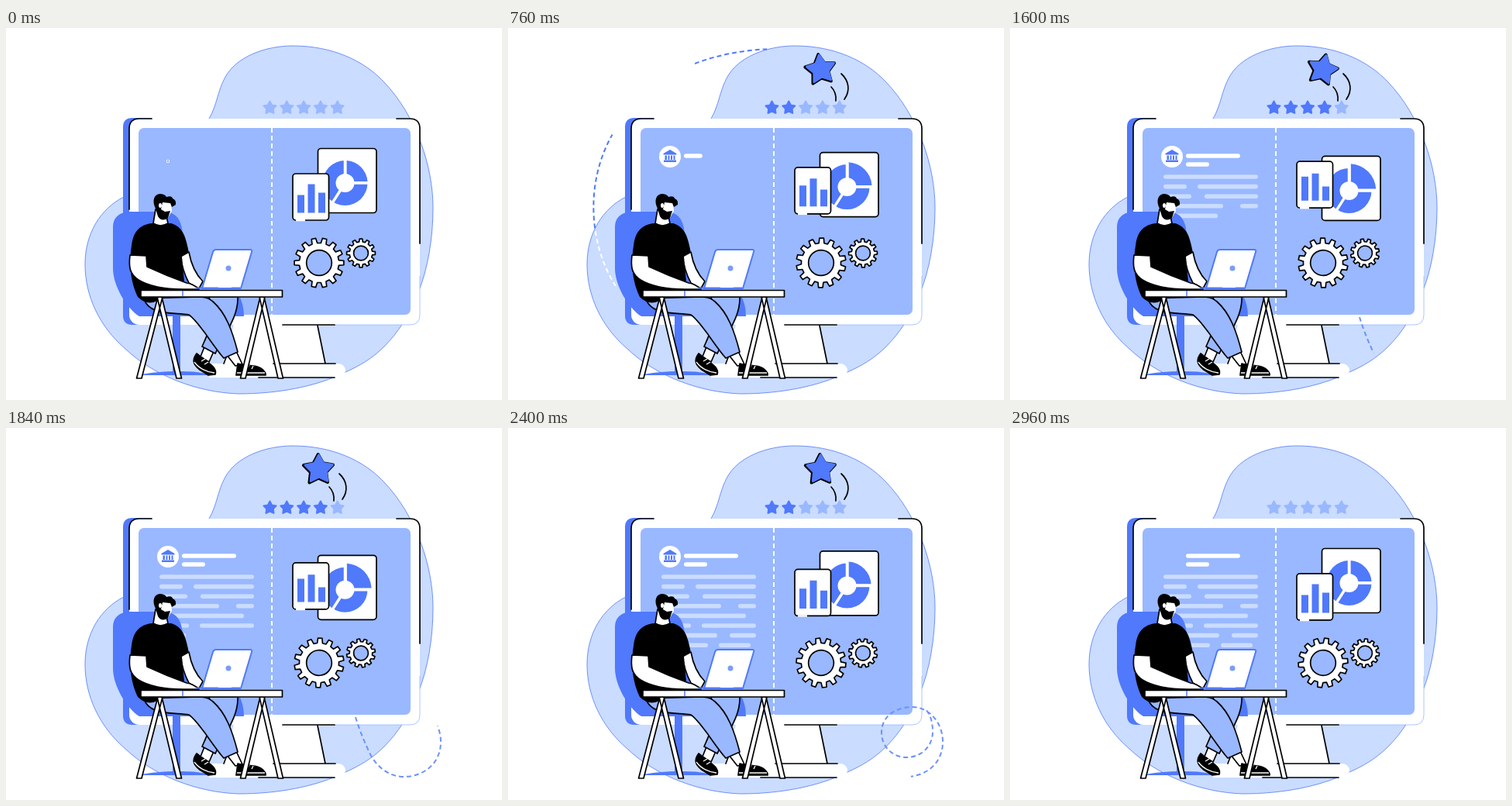
An HTML page that plays this animation: 640x480 px, repeating every 3000 ms.

```html
<!DOCTYPE html>
<html>
<head>
<meta charset="utf-8">
<style>
html, body { margin: 0; width: 100%; height: 100%; overflow: hidden; background: #fff; }
svg { display: block; width: 640px; height: 480px; }
.b { fill: #5079fb; }
.l { fill: #99b8ff; }
.w { fill: #fff; }
.k { stroke: #000; stroke-width: 1.7; stroke-linejoin: round; stroke-linecap: round; }
.n { fill: none; }
.trail { fill: none; stroke-width: 2; stroke-dasharray: 6 4; }
</style>
</head>
<body>
<svg viewBox="0 0 640 480">
  <linearGradient id="split" gradientUnits="userSpaceOnUse" x1="0" y1="0" x2="0" y2="480">
    <stop offset=".54" stop-color="#5079fb"/>
    <stop offset=".54" stop-color="#fff"/>
  </linearGradient>

  <path fill="#cadcff" stroke="#5079fb" stroke-width=".8" d="M262 117C272 100 273 82 282 65C296 37 335 23 370 23C421 23 462 42 488 70C529 113 551 178 551 232C551 272 544 312 532 341C520 372 505 394 488 411C472 427 456 436 438 444C400 463 350 472 300 472C245 470 190 448 154 414C120 385 102 345 102 305C102 265 122 233 152 218Z"/>

  <!-- monitor -->
  <path class="w" d="M294 383H402L412 433H429A9 9 0 0 1 429 451H262V433H280Z"/>
  <path class="k n" d="M402 384L412 433M292 404L281 433M345 433H425M326 451H424"/>
  <path class="b" d="M188 116H163Q151 116 151 128V371Q151 383 163 383H188Z"/>
  <rect class="w" x="159" y="117" width="375" height="266" rx="13"/>
  <path class="n" stroke="#99b8ff" stroke-width=".8" d="M534 320V370Q534 383 521 383H424"/>
  <path class="k n" d="M188 117H172Q159 117 159 130V234M504 117H521Q534 117 534 130V278M357 383H424"/>
  <rect class="l" x="171" y="129" width="351" height="241" rx="7"/>
  <path class="n" stroke="#fff" stroke-width="2" stroke-dasharray="6 4" d="M343 129V370"/>

  <!-- page text -->
  <g id="text" stroke-width="5.6" stroke-linecap="round"></g>
  <g id="icon">
    <circle class="w" r="14"/>
    <path class="b" d="M-8.500-4L0-9L8.500-4V-2.500H-8.500ZM-6.500-1.500H-4V4H-6.500ZM-2.500-1.500H-.5V4H-2.500ZM1-1.500H3V4H1ZM4.500-1.500H6.500V4H4.500ZM-8 4.500H8V7H-8Z"/>
  </g>

  <!-- charts -->
  <g id="pieCard">
    <rect class="w k" x="402.500" y="155.500" width="75.500" height="83" rx="4"/>
    <g transform="translate(437.500 200)">
      <circle class="b" r="29"/>
      <path class="w" d="M0 0V-31H31V0Z"/>
      <path id="slice" class="b" d="M2-2V-29A29 29 0 0 1 29-2Z"/>
      <path stroke="#fff" stroke-width="3.500" d="M0 0V-30M0 0H30M0 0L-16 25"/>
      <circle class="w" r="12"/>
    </g>
  </g>
  <g id="barCard">
    <rect class="w k" x="370" y="188" width="46.500" height="60" rx="4"/>
    <path stroke="#fff" stroke-width="2.500" d="M374 248H386"/>
    <path id="bars" class="b"/>
  </g>
  <g id="gears"></g>

  <!-- ratings -->
  <g id="stars"></g>
  <g id="badge">
    <path class="k n" d="M14 22Q21 29 20 40M27 5C37 14 39 27 31 38"/>
    <g id="bigStar"></g>
  </g>
  <g id="trails"></g>

  <!-- chair -->
  <path class="b" d="M157 237H204C222 238 228 250 228 272L236 344H300Q307 356 307 372H172C156 362 138 333 138 310V257Q138 240 157 237Z"/>
  <path class="b" d="M215 370H225V443Q252 443 265 448H171Q185 444 215 443Z"/>

  <!-- legs -->
  <path class="w k" d="M257 409L251 424L262 431L269 415Z"/>
  <path class="l k" d="M262 347H299C300 370 286 389 270 420L253 411C262 392 270 372 262 347Z"/>
  <path class="w k" d="M285 422L296 436L305 434L297 417Z"/>
  <path class="l k" d="M178 349C184 371 215 367 236 370C250 380 263 405 281 426L299 418C292 391 284 368 267 353Q260 347 250 347Z"/>
  <path class="k" d="M246 420C240 428 241 434 250 441L261 448L270 447Q272 441 265 435Z"/>
  <path class="n" stroke="#fff" stroke-width="1.300" d="M243 431Q252 443 269 445M252 430L257 427M256 434L261 431"/>
  <path class="k" d="M299 433C309 437 329 432 335 446V448H297Z"/>
  <path class="n" stroke="#fff" stroke-width="1.300" d="M298 445H334M311 440L314 435M317 440L319 436"/>

  <!-- torso and head -->
  <path class="w k" d="M225 292L236 289C239 306 245 318 254 327L249 336L236 329Q227 312 225 292Z"/>
  <path d="M188 252C172 254 164 263 162 281C158 305 161 329 170 347Q182 359 195 352L231 338L227 295L236 290C232 270 229 257 213 252Z"/>
  <path class="w k" d="M160 293L181 294L182 308C199 316 219 324 233 329Q241 330 249 337H229C206 337 184 333 171 325C160 318 158 309 160 293Z"/>
  <path class="w k" d="M193 234L190 252Q199 258 209 252L207 243Z"/>
  <path class="w" d="M197 222L213 225L214 236L209 245H198Z"/>
  <path d="M193 233C188 223 191 215 198 214Q205 214 207 218Q214 216 215 220Q220 222 219 228L214 231L212 226L202 225L200 234L205 237L212 236L209 245Q201 251 196 243Z"/>
  <ellipse class="w" cx="199" cy="229" rx="2" ry="3"/>

  <!-- laptop and desk -->
  <path class="w" stroke="#5079fb" stroke-width="2" stroke-linejoin="round" d="M271 286H315Q318 286 317 289L303 336H253L267 289Q268 286 271 286Z"/>
  <circle cx="287" cy="310" r="3.500" fill="#7a9cfb"/>
  <path stroke="#5079fb" stroke-width="2" d="M245 335.500H274M291 335.500H302"/>
  <g class="w k">
    <path d="M196 347L168.500 452H175L202 347ZM195 347L220 452H226.500L201 347Z"/>
    <path d="M328 347L302.500 452H309L334 347ZM327 347L351 452H357.500L333 347Z"/>
    <rect x="174" y="338.500" width="182.500" height="8.500"/>
  </g>
  <path stroke="#5079fb" stroke-width="1.500" d="M228 339V346"/>
</svg>
<script>
const LOOP = 3000, FRAME = 40, TAU = 2 * Math.PI;
const $ = id => document.getElementById(id);
const clamp = x => Math.min(1, Math.max(0, x));
const smooth = x => x * x * (3 - 2 * x);
const backOut = x => 1 + 2.7 * (x - 1) ** 3 + 1.7 * (x - 1) ** 2;
const progress = (t, start, duration) => clamp((t - start) / duration);
// grows past full size, holds, and leaves the same way
const pop = (t, start, end) => t < LOOP / 2 ? backOut(progress(t, start, 360)) : backOut(progress(end - t, 0, 240));

function add(parent, tag, attrs) {
  const el = document.createElementNS('http://www.w3.org/2000/svg', tag);
  for (const key in attrs) el.setAttribute(key, attrs[key]);
  return parent.appendChild(el);
}

function place(el, x, y, scale = 1, angle = 0) {
  el.setAttribute('transform', `translate(${x} ${y}) rotate(${angle}) scale(${scale})`);
}

const polar = points => 'M' + points.map(([r, a]) =>
  (r * Math.cos(a)).toFixed(2) + ' ' + (r * Math.sin(a)).toFixed(2)).join('L') + 'Z';

const star = r => polar(Array.from({ length: 10 }, (_, i) =>
  [i % 2 ? r * .53 : r, (i / 10 - .25) * TAU]));

function gear(teeth, r) {
  const hole = r * .51, points = [];
  for (let i = 0; i < teeth; i++)
    for (const side of [-1, 1]) {
      const pair = [[r * .8, (i + side * .3) * TAU / teeth], [r, (i + side * .19) * TAU / teeth]];
      points.push(...(side < 0 ? pair : pair.reverse()));
    }
  return polar(points) + `M${hole} 0A${hole} ${hole} 0 1 0 ${-hole} 0A${hole} ${hole} 0 1 0 ${hole} 0Z`;
}

// text is written stroke after stroke; each row has at most one gap
let total = 0;
const strokes = [];
function write(y, x1, x2, stroke) {
  strokes.push({ el: add($('text'), 'path', { stroke }), y, x1, x2, at: total });
  total += x2 - x1;
}
write(165, 227, 297, '#fff');
write(176, 227, 257, '#fff');
const rows = [[320], [228, 242], [234, 251], [275, 297], [307], [236, 250], [270, 286], [258, 272, 313]];
rows.forEach(([end, next, right = 320], i) => {
  const y = 192 + 12.6 * i;
  write(y, 198, end, '#cadcff');
  if (next) write(y, next, right, '#cadcff');
});

const stars = Array.from({ length: 5 }, (_, i) => add($('stars'), 'path', {
  d: star(8.5), transform: `translate(${340.5 + 21.8 * i} 103)`, 'stroke-width': 2, 'stroke-linejoin': 'round'
}));

add($('bigStar'), 'path', { d: star(20), class: 'b', stroke: '#000', 'stroke-width': 4, 'stroke-linejoin': 'round' });
add($('bigStar'), 'path', { d: star(18.5), class: 'b', transform: 'translate(.8 -.6)', stroke: '#5079fb', 'stroke-width': 3, 'stroke-linejoin': 'round' });

const bigGear = add($('gears'), 'path', { d: gear(14, 32), class: 'w k' });
const smallGear = add($('gears'), 'path', { d: gear(12, 18.5), class: 'w k' });
$('gears').setAttribute('fill-rule', 'evenodd');

const trails = [
  { start: 100, stroke: '#5079fb', d: 'M241 46Q285 29 340 27' },
  { start: 100, stroke: 'url(#split)', d: 'M139 333C103 277 98 192 141 127' },
  { start: 1520, stroke: '#6d91fa', d: 'M451 373Q458 396 470 421C480 440 497 450 513 450C540 450 561 432 561 405C561 380 543 360 522 360C500 360 482 372 482 393C482 412 497 425 514 425C533 425 548 411 548 392Q548 372 538 362' }
].map(({ start, stroke, d }, i) => {
  const mask = add($('trails'), 'mask', { id: 'reveal' + i, maskUnits: 'userSpaceOnUse', x: 0, y: 0, width: 640, height: 480 });
  add($('trails'), 'path', { d, stroke, class: 'trail', mask: `url(#reveal${i})` });
  return { start, cover: add(mask, 'path', { d, class: 'n', stroke: '#fff', 'stroke-width': 6, pathLength: 1 }) };
});

function draw(t) {
  const wave = (1 - Math.cos(TAU * t / LOOP)) / 2;

  const pen = total * smooth(progress(t, 600, 1700));
  for (const { el, y, x1, x2, at } of strokes) {
    const len = Math.min(pen - at, x2 - x1);
    el.setAttribute('d', len > 0 ? `M${x1 + 2.8} ${y}H${x1 + Math.max(2.81, len - 2.8)}` : '');
  }

  const size = pop(t, -12, 2940);
  place($('icon'), 209, 166 + 7 * clamp(1 - size), size);

  place($('pieCard'), 0, 10 * wave);
  place($('barCard'), 0, -16 * wave);
  place($('slice'), 0, 0, 1 + .2 * wave);
  $('bars').setAttribute('d', [23 + 8 * wave, 37 - 2 * wave, 26 - 8 * wave]
    .map((h, i) => `M${376 + 13.5 * i} 238.500v${-h}h9v${h}z`).join(''));

  const turn = 360 * t / LOOP;
  place(bigGear, 404, 303, 1, turn);
  place(smallGear, 458, 290.5, 1, -turn);

  stars.forEach((el, i) => {
    const lit = t >= 380 + 340 * i && t < 2760 - 230 * i;
    const color = lit ? '#5079fb' : '#99b8ff';
    el.setAttribute('fill', color);
    el.setAttribute('stroke', color);
  });

  place($('badge'), 403, 54, pop(t, 140, 2940));
  place($('bigStar'), 0, 0, 1, 14 * Math.sin(TAU * (t - 1240) / 1180));

  for (const { cover, start } of trails) {
    const head = progress(t, start, 700), tail = progress(t, start + 700, 700);
    cover.setAttribute('stroke-dasharray', `${head - tail} 3`);
    cover.setAttribute('stroke-dashoffset', -tail);
    cover.style.display = head > tail ? '' : 'none';
  }
}

const start = performance.now();
function tick() {
  const t = (performance.now() - start) % LOOP;
  draw(Math.floor(t / FRAME) * FRAME);
  requestAnimationFrame(tick);
}
tick();
</script>
</body>
</html>
```
